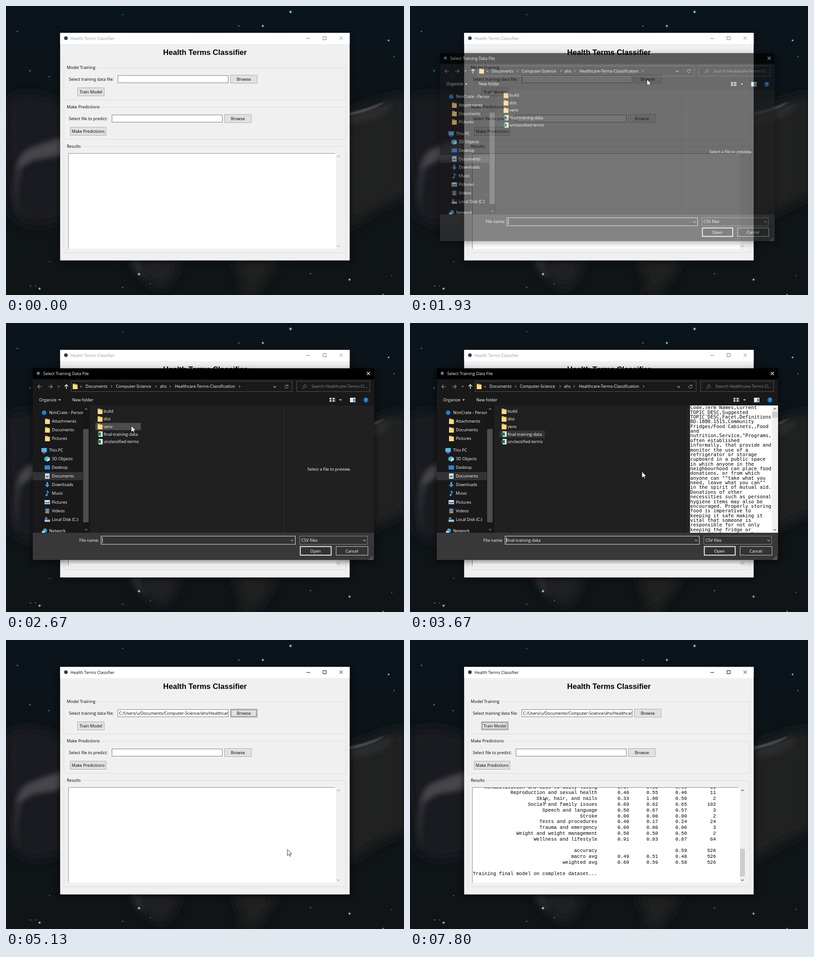
These frames come from a looping animation (877x638 px, 8 s). An HTML page:

```html
<!DOCTYPE html>
<html lang="en">
<head>
<meta charset="utf-8">
<title>Health Terms Classifier</title>
<style>
  html, body { margin: 0; width: 100%; height: 100%; overflow: hidden; background: #0d1418; }
  svg { display: block; width: 877px; height: 638px; }
  text { font: 9.1px "Open Sans", "Noto Sans", sans-serif; white-space: pre; }
  .head { font: bold 16.7px "Liberation Sans", Arial, sans-serif; }
  .mono { font: 10.63px "Liberation Mono", "Courier New", monospace; }
  .csv { font: 10.6px "DejaVu Sans Mono", monospace; }
</style>
</head>
<body>
<script>
const LOOP = 8000, STEP = 1000 / 15;
const NS = 'http://www.w3.org/2000/svg';

function el(parent, tag, attrs = {}, content) {
  const node = document.createElementNS(NS, tag);
  for (const k in attrs) node.setAttribute(k, attrs[k]);
  if (content !== undefined) node.textContent = content;
  parent.appendChild(node);
  return node;
}
const group = (p, attrs) => el(p, 'g', attrs);
const fillBox = (p, x, y, width, height, fill) => el(p, 'rect', { x, y, width, height, fill });
const frameBox = (p, x, y, w, h, fill, stroke, sw = 1) =>
  el(p, 'rect', { x: x + .5, y: y + .5, width: w - 1, height: h - 1, fill, stroke, 'stroke-width': sw });
const label = (p, x, y, s, fill = '#000', more = {}) => el(p, 'text', { x, y, fill, ...more }, s);
const line = (p, d, stroke, sw = 1) => el(p, 'path', { d, fill: 'none', stroke, 'stroke-width': sw });
const shape = (p, d, fill) => el(p, 'path', { d, fill });
const dot = (p, cx, cy, r, fill, opacity = 1) => el(p, 'circle', { cx, cy, r, fill, opacity });
const show = (node, on) => node.setAttribute('visibility', on ? 'inherit' : 'hidden');
const chevron = (p, x, y, dir, color, s = 2.8) =>
  line(p, `M${x - s} ${y - dir * s / 2}L${x} ${y + dir * s / 2}L${x + s} ${y - dir * s / 2}`, color, 1.1);

const svg = el(document.body, 'svg', { viewBox: '0 0 877 638', width: 877, height: 638 });
const defs = el(svg, 'defs');
function blur(id, s) {
  const f = el(defs, 'filter', { id, x: '-100%', y: '-100%', width: '300%', height: '300%' });
  el(f, 'feGaussianBlur', { stdDeviation: s });
}
function clip(id, x, y, width, height) {
  el(el(defs, 'clipPath', { id }), 'rect', { x, y, width, height });
}
blur('haze', 13); blur('wisp', 6); blur('thin', 1.6); blur('shade', 7);
clip('logClip', 138, 326, 588, 210);
clip('pathClip', 247, 154, 242, 15);
clip('navClip', 59, 183, 111, 280);
clip('csvClip', 617, 183, 180, 280);

// Night sky
const grad = el(defs, 'linearGradient', { id: 'sky', x1: 0, y1: 0, x2: 0, y2: 1 });
[[0, '#0a141b'], [.35, '#0d1418'], [1, '#101416']].forEach(([offset, c]) =>
  el(grad, 'stop', { offset, 'stop-color': c }));
fillBox(svg, 0, 0, 877, 638, 'url(#sky)');
const cloud = (d, fill, opacity, f) => el(svg, 'path', { d, fill, opacity, filter: `url(#${f})` });
cloud('M0 205Q50 180 125 215V470Q60 500 15 465Q-5 330 0 205Z', '#1d1f22', .9, 'haze');
cloud('M125 290Q85 300 45 318Q22 335 24 365Q42 350 62 340Q95 336 125 328Z', '#55545a', .75, 'wisp');
cloud('M24 350Q8 410 26 468Q20 410 36 362Z', '#34363a', .7, 'wisp');
cloud('M750 240Q810 205 885 195V420Q820 440 750 495Z', '#202122', .95, 'haze');
cloud('M757 236Q800 226 835 211Q810 232 757 241Z', '#737376', .6, 'thin');
cloud('M757 240Q800 232 850 212Q850 250 757 262Z', '#37383a', .5, 'wisp');
cloud('M270 555H385Q375 600 345 625Q300 610 270 555Z', '#222427', .9, 'haze');
cloud('M274 560Q284 590 312 602Q294 580 296 560Z', '#3a3b3e', .5, 'wisp');
cloud('M495 555H600Q580 600 545 638H520Q525 600 495 555Z', '#232324', .9, 'haze');
[[627, 13, 2], [566, 44, 1.7], [293, 592, 2], [74, 624, 1.8], [843, 76, 1.4], [757, 604, 1.7],
 [513, 44, 1], [855, 112, .9], [25, 56, 1], [53, 143, 1.1], [95, 156, .9], [257, 19, .8],
 [54, 618, .9], [65, 618, .8], [671, 591, .9], [850, 595, .8], [318, 613, .8], [257, 621, .9],
 [96, 564, .8], [831, 637, 1.2]].forEach(([x, y, r]) => {
  dot(svg, x, y, r * 2, '#3f7893', .35);
  dot(svg, x, y, r, '#a9d8ea', r > 1.2 ? 1 : .7);
});

// Main window
const shade = fillBox(svg, 118, 62, 641, 503, '#000');
shade.setAttribute('filter', 'url(#shade)');
const win = group(svg);
fillBox(win, 119.3, 59.5, 638, 502.2, '#f0f0f0');
fillBox(win, 119.3, 59.5, 638, 24.5, '#fff');
dot(win, 132, 71, 4, '#243f58');
const title = label(win, 142, 74.7, 'Health Terms Classifier');
const caption = line(win, 'M662 71.5h8M698.5 67.5h7v7h-7zM735 67.5l7 7M742 67.5l-7 7', '#000');
label(win, 438.5, 108, 'Health Terms Classifier', '#000', { class: 'head', 'text-anchor': 'middle' });

function section(y, h, name, gap) {
  frameBox(win, 127, y, 622, h, 'none', '#dcdcdc');
  fillBox(win, 132, y - 2, gap, 5, '#f0f0f0');
  label(win, 134, y + 3.4, name);
}
function button(x, y, w, name) {
  const box = frameBox(win, x, y, w, 19, '#e1e1e1', '#adadad');
  const focus = frameBox(win, x + 2, y + 2, w - 4, 15, 'none', '#222');
  focus.setAttribute('stroke-dasharray', '1 1');
  label(win, x + w / 2, y + 12.7, name, '#000', { 'text-anchor': 'middle' });
  return (hover, focused, down) => {
    box.setAttribute('fill', down ? '#cce4f7' : hover ? '#e5f1fb' : '#e1e1e1');
    box.setAttribute('stroke', hover ? '#0078d7' : focused ? '#8a8a8a' : '#adadad');
    show(focus, focused);
  };
}
section(136, 72, 'Model Training', 68);
section(223, 72, 'Make Predictions', 77);
section(310, 235, 'Results', 34);
label(win, 138.5, 164.7, 'Select training data file:');
label(win, 138.5, 251.7, 'Select file to predict:');
frameBox(win, 246, 153, 244, 17, '#fff', '#7a7a7a');
frameBox(win, 233, 240, 244, 17, '#fff', '#7a7a7a');
const browse = button(494, 152, 60, 'Browse');
const train = button(157, 180, 60, 'Train Model');
button(481, 239, 60, 'Browse')(false, false);
button(141, 267, 80, 'Make Predictions')(false, false);
const chosen = label(group(win, { 'clip-path': 'url(#pathClip)' }), 249, 164.7,
  'C:/Users/u/Documents/Computer-Science/ahs/Healthcare-Terms-Classification');

fillBox(win, 137, 325, 590, 211, '#fff');
line(win, 'M137.5 536V325.5H725', '#8c8c8c');
const arrows = [chevron(win, 732.5, 332, -1, '#000'), chevron(win, 732.5, 530, 1, '#000')];
const thumb = fillBox(win, 727, 461, 11, 61, '#cdcdcd');

const log = group(win, { 'clip-path': 'url(#logClip)' });
const lines = (rows, y) => {
  const g = group(log);
  rows.forEach((s, i) => label(g, 138.5, y + i * 12.78, s, '#000', { class: 'mono' }));
  return g;
};
const rule = '='.repeat(50);
const logA = lines([rule, 'TRAINING MODEL', rule, 'Loading training data...'], 335.7);
const logB = lines(['Data loaded: 2630 samples', 'Categories: 39', 'Training and evaluating model...'],
  335.7 + 4 * 12.78);
const report = `Rehabilitation and aids to daily living|0.67|0.55|0.60|11
Reproduction and sexual health|0.40|0.55|0.46|11
Skin, hair, and nails|0.33|1.00|0.50|2
Social and family issues|0.69|0.62|0.65|102
Speech and language|0.50|0.67|0.57|3
Stroke|0.00|0.00|0.00|2
Tests and procedures|0.40|0.17|0.24|24
Trauma and emergency|0.00|0.00|0.00|3
Weight and weight management|0.50|0.50|0.50|2
Wellness and lifestyle|0.91|0.83|0.87|64

accuracy|||0.59|526
macro avg|0.49|0.51|0.48|526
weighted avg|0.60|0.59|0.58|526
`.split('\n').map(row => row.split('|').map((c, i) => i ? c.padStart(i > 1 ? 10 : 11) : c.padStart(43)).join(''));
const logC = lines([...report, 'Training final model on complete dataset...'], 327.6);

// File dialog
const dlg = group(svg);
const dlgShade = fillBox(dlg, 57, 103, 756, 424, '#000');
dlgShade.setAttribute('filter', 'url(#shade)');
dlgShade.setAttribute('opacity', .5);
fillBox(dlg, 59, 100, 752, 423, '#191919');
fillBox(dlg, 59, 100, 752, 24, '#000');
fillBox(dlg, 186, 182, 625, 281, '#202020');
fillBox(dlg, 612, 182, 1, 281, '#303030');
fillBox(dlg, 59, 463, 752, 60, '#383838');
const dlgIcon = dot(dlg, 71, 111, 3.5, '#4a7fa8');
const dlgTitle = label(dlg, 82, 115.2, 'Select Training Data File', '#fff');
const dlgClose = line(dlg, 'M795 108l7 7M802 108l-7 7', '#fff', 1.1);

line(dlg, 'M79 140.5h-9M74 136.5l-4 4l4 4M93 140.5h9M98 136.5l4 4l-4 4', '#9a9a9a', 1.2);
chevron(dlg, 116, 140, 1, '#9a9a9a', 2.2);
line(dlg, 'M133 145.5v-9M129 140l4-4l4 4', '#fff', 1.4);
frameBox(dlg, 143, 128, 488, 24, 'none', '#535353');
frameBox(dlg, 640, 128, 162, 24, 'none', '#535353');
const folder = (p, x, y) => {
  shape(p, `M${x} ${y - 6}h5l1 1.5h4.5v10.5h-10.5z`, '#e9b949');
  shape(p, `M${x} ${y - 3}h10.5v9h-10.5z`, '#ffdc82');
};
folder(dlg, 147, 140);
const crumb = x => line(dlg, `M${x - 1.5} 137.5l2.5 2.5l-2.5 2.5`, '#ccc');
label(dlg, 163, 142.5, '«', '#ccc');
[[175, 'Documents'], [242, 'Computer-Science'], [339, 'ahs'], [372, 'Healthcare-Terms-Classification']]
  .forEach(([x, s]) => label(dlg, x, 143.3, s, '#fff'));
[233, 331, 362, 515].forEach(crumb);
chevron(dlg, 592, 141, 1, '#ccc');
line(dlg, 'M620.5 138a3.5 3.5 0 1 0 1 2.5M621.5 136v2.5h-3', '#aaa');
label(dlg, 673, 143.3, 'Search Healthcare-Terms-Cl...', '#8c8c8c');
line(dlg, 'M656 141a3 3 0 1 1 1 1l-4 3.5', '#8c8c8c');
label(dlg, 73, 172.8, 'Organize', '#fff');
label(dlg, 146, 172.8, 'New folder', '#fff');
shape(dlg, 'M115 168.5h6l-3 3zM734 168.5h6l-3 3z', '#ddd');
for (const x of [713, 720]) for (const y of [165, 170]) {
  fillBox(dlg, x, y, 3, 4, '#ddd');
  fillBox(dlg, x + 3.5, y, 2, 4, '#888');
}
fillBox(dlg, 758, 165, 12, 10, '#e8e8e8');
fillBox(dlg, 765, 167, 4, 7, '#2c8ad8');
dot(dlg, 793, 170, 5.5, '#0f6fd0');
label(dlg, 793, 173.3, '?', '#fff', { 'text-anchor': 'middle', 'font-weight': 'bold' });

// Navigation pane
const nav = group(dlg, { 'clip-path': 'url(#navClip)' });
fillBox(nav, 59, 329, 110, 18, '#333');
const icons = {
  drive: y => dot(nav, 84, y, 5, '#1e7fd6'),
  folder: y => folder(nav, 86, y),
  pc: y => { fillBox(nav, 78, y - 5, 12, 9, '#58b4ee'); fillBox(nav, 81, y + 5, 6, 1.5, '#8cc8ee'); },
  cube: y => { shape(nav, `M90.5 ${y - 6}l6 3v6l-6 3l-6-3v-6z`, '#4db1d8'); shape(nav, `M90.5 ${y}l6-3v6l-6 3z`, '#b9e4f2'); },
  desk: y => fillBox(nav, 85, y - 4.5, 12, 9, '#1f8ce6'),
  page: y => { fillBox(nav, 86, y - 6, 10, 12, '#d4dde4'); fillBox(nav, 88, y - 1, 6, 4, '#4a8dbd'); },
  down: y => shape(nav, `M89 ${y - 6}h4v6h3.5l-5.5 6l-5.5-6h3.5z`, '#2f9bf0'),
  note: y => { line(nav, `M91 ${y + 4}v-9l4 4`, '#3aa0f5', 1.6); dot(nav, 89.2, y + 4, 2.2, '#3aa0f5'); },
  pic: y => { fillBox(nav, 85, y - 4.5, 12, 9, '#e6eef4'); shape(nav, `M86 ${y + 3}v-5l5 2l5-2v5z`, '#418bbd'); },
  film: y => { fillBox(nav, 86, y - 5, 10, 11, '#555e6a'); fillBox(nav, 88, y - 4, 6, 4, '#6d8dd8'); fillBox(nav, 88, y + 1, 6, 4, '#c58b62'); },
  disk: y => { fillBox(nav, 85, y, 12, 5, '#b5bcc2'); fillBox(nav, 86, y - 5, 5, 4, '#35a0e8'); },
  net: y => { dot(nav, 86, y - 1, 4.5, '#3b9de0'); fillBox(nav, 79, y, 7, 5, '#9fd2f0'); }
};
[[198, 'drive', 'NimCrate - Persor'], [217, 'folder', 'Attachments'], [236, 'folder', 'Documents'],
 [255, 'folder', 'Pictures'], [281, 'pc', 'This PC'], [300, 'cube', '3D Objects'], [319, 'desk', 'Desktop'],
 [338, 'page', 'Documents'], [357, 'down', 'Downloads'], [376, 'note', 'Music'], [395.5, 'pic', 'Pictures'],
 [414.5, 'film', 'Videos'], [434, 'disk', 'Local Disk (C:)'], [459, 'net', 'Network']
].forEach(([y, icon, s]) => {
  icons[icon](y);
  label(nav, /drive|pc|net/.test(icon) ? 95 : 101, y + 3.3, s, '#fff');
});
fillBox(dlg, 170, 183, 13, 280, '#171717');
fillBox(dlg, 170, 234, 12, 206, '#4d4d4d');
chevron(dlg, 176.5, 190, -1, '#999');
chevron(dlg, 176.5, 456, 1, '#999');

// File list
const rows = ['build', 'dist', 'venv', 'final-training-data', 'unclassified-terms'].map((s, i) => {
  const y = 195 + i * 16.75;
  const back = fillBox(dlg, 197, y - 8, 100, 16, '#4d4d4d');
  if (i < 3) folder(dlg, 202, y);
  else { fillBox(dlg, 204, y - 6, 9, 12, '#e9efe9'); fillBox(dlg, 202, y - 3.5, 7, 7, '#1d7a45'); }
  label(dlg, 215, y + 3.3, s, '#fff');
  return { y, back };
});

// Preview pane
const hint = label(dlg, 712, 325.5, 'Select a file to preview.', '#fff', { 'text-anchor': 'middle' });
const preview = group(dlg);
fillBox(preview, 617, 182, 180, 281, '#fff');
fillBox(preview, 797, 182, 14, 281, '#f0f0f0');
fillBox(preview, 798, 196, 12, 13, '#cdcdcd');
chevron(preview, 804, 189.5, -1, '#444');
chevron(preview, 804, 456.5, 1, '#444');
const csv = group(preview, { 'clip-path': 'url(#csvClip)' });
`Code,Term Names,Current
TOPIC_DESC,Suggested
TOPIC_DESC,Facet,Definitions
BD-1800.1515,Community
Fridges/Food Cabinets,,Food
and
nutrition,Service,"Programs,
often established
informally, that provide and
monitor the use of a
refrigerator or storage
cupboard in a public space
in which anyone in the
neighbourhood can place food
donations, or from which
anyone can ""take what you
need, leave what you can""
in the spirit of mutual aid.
Donations of other
necessities such as personal
hygiene items may also be
encouraged. Properly storing
food is imperative to
keeping it safe making it
vital that someone is
responsible for not only
keeping the fridge or
cupboard clean, but also`.split('\n').forEach((s, i) => label(csv, 617.6, 190.3 + i * 10.36, s, '#000', { class: 'csv' }));

// Dialog footer
label(dlg, 205, 482.7, 'File name:', '#fff', { 'text-anchor': 'end' });
frameBox(dlg, 209, 470, 429, 19, '#333', '#e6e6e6');
frameBox(dlg, 647, 470, 150, 19, '#333', '#8a8a8a');
label(dlg, 651, 482.7, 'CSV files', '#fff');
chevron(dlg, 630.5, 480, 1, '#bbb');
chevron(dlg, 790, 480, 1, '#bbb');
const marked = fillBox(dlg, 212, 473, 79, 13, '#0078d7');
const fileName = label(dlg, 212, 482.7, 'final-training-data', '#fff');
const caret = fillBox(dlg, 212, 473, 1, 13, '#fff');
const openBtn = frameBox(dlg, 648, 493, 69, 20, '#333', '#fff', 1.8);
frameBox(dlg, 727, 493, 71, 20, '#333', '#d0d0d0');
label(dlg, 682, 506.7, 'Open', '#fff', { 'text-anchor': 'middle' });
label(dlg, 762, 506.7, 'Cancel', '#fff', { 'text-anchor': 'middle' });
[[806, 516], [806, 519], [803, 519], [806, 522], [803, 522], [800, 522]]
  .forEach(([x, y]) => fillBox(dlg, x, y - 1, 1.5, 1.5, '#aaa'));

// Pointer
const arrow = el(svg, 'path', { d: 'M0 0V14L3.2 11L5.4 15.5L7.5 14.6L5.4 10.2H10Z',
  fill: '#fff', stroke: '#000', 'stroke-width': .8 });
const beam = line(svg, 'M-2.5-5.5h2L0-5L.5-5.5h2M0-5V5M-2.5 5.5h2L0 5L.5 5.5h2', '#000');

const ease = {
  lin: u => u,
  both: u => u * u * (3 - 2 * u),
  out: u => 1 - (1 - u) ** 2,
  in: u => u ** 1.5
};
const path = [
  [0, 885, 645], [65, 873, 634], [133, 868, 634], [200, 868, 634], [400, 862, 633], [600, 862, 633],
  [1333, 522, 162, 'both'], [2267, 522, 162], [2667, 276, 227, 'both'], [2933, 268, 245, 'out'],
  [3400, 268, 245], [3667, 511, 328, 'in'], [4267, 687, 504, 'out'], [5067, 687, 504],
  [6000, 195, 199, 'out'], [6133, 188, 192], [7133, 188, 192], [7800, 298, 356, 'both'], [LOOP, 298, 356]
];
function pointerAt(t) {
  const i = path.findIndex(k => k[0] > t);
  const [t0, x0, y0] = path[i - 1], [t1, x1, y1, mode = 'lin'] = path[i];
  const u = ease[mode]((t - t0) / (t1 - t0));
  return [x0 + (x1 - x0) * u, y0 + (y1 - y0) * u];
}
const clamp = v => Math.max(0, Math.min(1, v));

function render(time) {
  const t = Math.floor((time + 5) / STEP) * STEP % LOOP;
  const at = ms => t > ms - 20;
  const [px, py] = pointerAt(t);
  const inside = (x, y, w, h) => px >= x && px < x + w && py >= y && py < y + h;

  const closing = at(4530);
  const fade = closing ? 1 - clamp((t - 4485) / 515) : clamp((t - 1620) / 510);
  const shrink = closing ? .034 : .05;
  const scale = 1 - shrink * (1 - fade);
  show(dlg, fade > 0);
  dlg.setAttribute('opacity', fade);
  dlg.setAttribute('transform', `translate(435 311.5) scale(${scale}) translate(-435 -311.5)`);

  const active = at(1530) && !at(1670) || closing;
  title.setAttribute('fill', active ? '#000' : '#999');
  caption.setAttribute('stroke', active ? '#000' : '#777');
  shade.setAttribute('opacity', active ? .6 : .35);

  const free = fade === 0;
  browse(free && inside(494, 152, 60, 19), closing && !at(6270), at(1530) && free && !closing);
  train(free && inside(157, 180, 60, 19), at(6270), at(6270) && !at(6400));
  show(chosen, at(5000));
  show(logA, at(6400) && !at(7200));
  show(logB, at(6470) && !at(7200));
  show(logC, at(7200));
  show(thumb, at(7200));
  arrows.forEach(a => a.setAttribute('stroke', at(7200) ? '#444' : '#a5a5a5'));

  const picked = at(2930);
  rows.forEach(({ y, back }, i) => {
    const hover = inside(197, y - 8, 100, 16), sel = picked && i === 3;
    show(back, hover || sel);
    back.setAttribute('fill', hover ? sel ? '#666' : '#4d4d4d' : '#333');
  });
  show(fileName, picked);
  show(marked, at(4330));
  show(caret, !at(4330));
  show(hint, !at(3200));
  show(preview, at(3270));
  openBtn.setAttribute('fill', inside(648, 493, 69, 20) ? '#5c5c5c' : '#333');
  show(dlgIcon, !closing);
  show(dlgClose, !closing);
  dlgTitle.setAttribute('x', closing ? 65 : 82);

  const typing = free && inside(137, 325, 590, 211) && at(7200);
  show(arrow, !typing);
  show(beam, typing);
  (typing ? beam : arrow).setAttribute('transform', `translate(${Math.round(px)} ${Math.round(py)})`);
}

const start = performance.now();
(function tick() {
  render((performance.now() - start) % LOOP);
  requestAnimationFrame(tick);
})();
</script>
</body>
</html>
```
